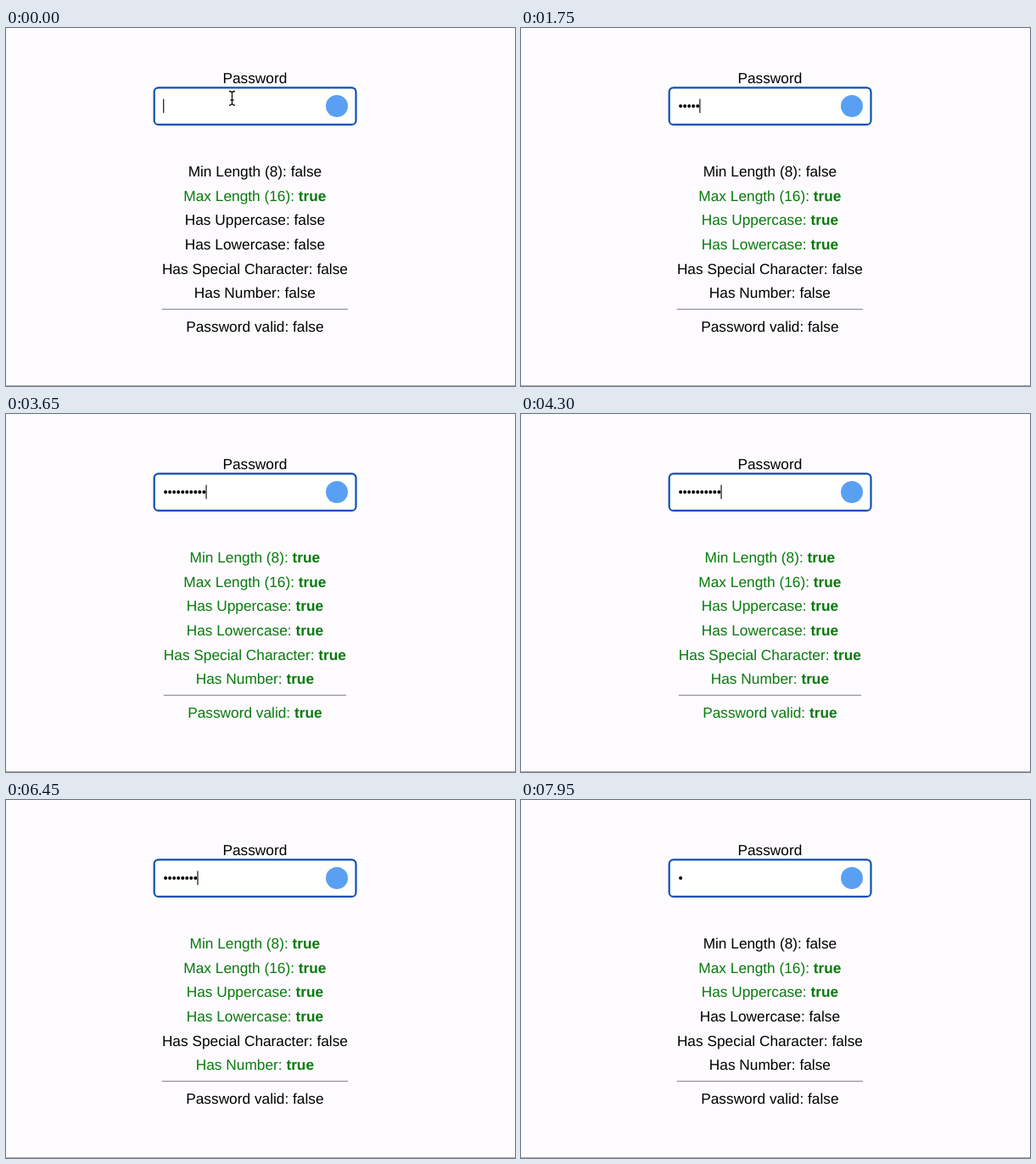
Write an HTML page that moves like this. It is 600 by 422 pixels and loops after 8000 ms.

```html
<!DOCTYPE html>
<html lang="en">
<head>
<meta charset="utf-8">
<title>Password rules</title>
<style>
  html, body { margin: 0; width: 100%; height: 100%; overflow: hidden; background: #fdfbfe; }
  svg { display: block; width: 600px; height: 422px; }
  text {
    font: 17.3px "Liberation Sans", Arial, sans-serif;
    text-anchor: middle;
    text-rendering: geometricPrecision;
  }
  .ok { fill: #087a0c; }
  .ok tspan { font-weight: bold; }
</style>
</head>
<body>
<svg viewBox="0 0 600 422">
  <text x="293.4" y="65">Password</text>
  <rect x="174.7" y="70.3" width="237.8" height="43.6" rx="5" fill="#fff" stroke="#0e50b4" stroke-width="2.2"/>
  <circle cx="390" cy="92" r="13" fill="#5aa0f2"/>
  <g id="dots"></g>
  <rect id="caret" y="83.6" width="1.1" height="16.6"/>
  <path id="pointer" d="M263 74.5q3.5 0 3.5 2.5v11.5q0 2.5-3.5 2.5M270 74.5q-3.5 0-3.5 2.5v11.5q0 2.5 3.5 2.5M264.5 85h4" fill="none" stroke="#111" stroke-width="1.3"/>
  <g id="rows"></g>
  <rect id="rule" y="330.9" height="1.3" fill="#96949a"/>
  <rect y="421" width="600" height="1" fill="#a8a7aa"/>
</svg>
<script>
  const LOOP = 8000, MID = 293.4, STEP = 5.03;
  const PASSWORD = 'Abcdef12!x';
  const typed = [350, 600, 850, 1150, 1450, 1900, 2350, 2850, 3250, 3500];
  const erased = [4500, 4900, 6650, 6850, 7050, 7250, 7450, 7650, 7850];

  const rules = [
    ['Min Length (8)', s => s.length >= 8],
    ['Max Length (16)', s => s.length <= 16],
    ['Has Uppercase', s => /[A-Z]/.test(s)],
    ['Has Lowercase', s => /[a-z]/.test(s)],
    ['Has Special Character', s => /[^A-Za-z0-9]/.test(s)],
    ['Has Number', s => /\d/.test(s)]
  ];

  const byId = id => document.getElementById(id);

  function add(parent, tag, attrs) {
    const el = document.createElementNS('http://www.w3.org/2000/svg', tag);
    for (const name in attrs) el.setAttribute(name, attrs[name]);
    return parent.appendChild(el);
  }

  function addRow(label, y) {
    const row = add(byId('rows'), 'text', { x: MID, y });
    row.append(label + ': ');
    const value = add(row, 'tspan', {});
    return ok => {
      row.setAttribute('class', ok ? 'ok' : '');
      value.textContent = ok;
    };
  }

  const setRows = rules.map(([label], i) => addRow(label, 174.9 + 28.65 * i));
  const setValid = addRow('Password valid', 357.9);
  const dots = [...PASSWORD].map((_, i) =>
    add(byId('dots'), 'circle', { cx: 188.1 + STEP * i, cy: 92, r: 2 }));

  const show = (el, on) => el.setAttribute('visibility', on ? 'visible' : 'hidden');
  const count = (times, t) => times.filter(x => x <= t).length;
  let shown = -1;

  function setLength(n) {
    if (n === shown) return;
    shown = n;
    const text = PASSWORD.slice(0, n);
    const results = rules.map(([, test]) => test(text));
    results.forEach((ok, i) => setRows[i](ok));
    setValid(results.every(Boolean));
    dots.forEach((dot, i) => show(dot, i < n));
    byId('caret').setAttribute('x', 185.2 + STEP * n);
    const half = results[4] ? 107.6 : 109.6;
    byId('rule').setAttribute('x', MID - half);
    byId('rule').setAttribute('width', 2 * half);
  }

  function draw(now) {
    const t = now % LOOP;
    setLength(count(typed, t) - count(erased, t));
    show(byId('pointer'), t < 400);
    // Solid while typing, then blinking once a second
    const phase = t % 1000;
    show(byId('caret'), t < 4250 || (phase >= 250 && phase < 750));
    requestAnimationFrame(draw);
  }

  const start = performance.now();
  const frame = draw;
  frame(0);
</script>
</body>
</html>
```
